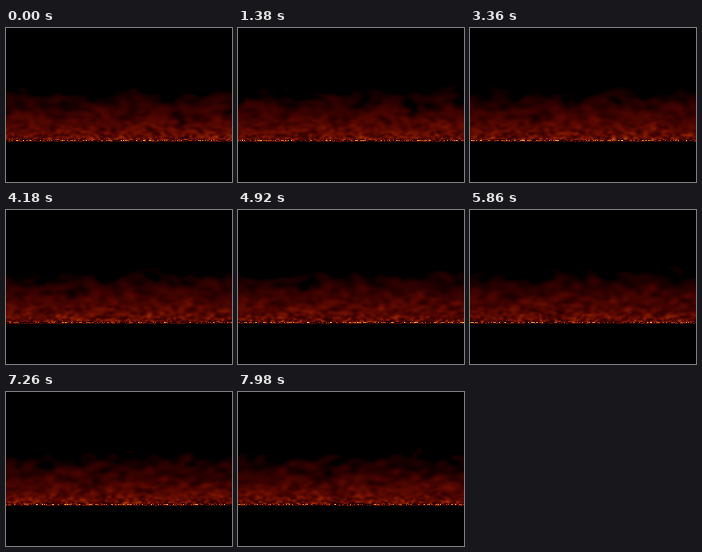
An HTML page with a canvas that plays this animation: 226x154 px, repeating every 8 s.

```html
<!DOCTYPE html>
<html lang="en">
<head>
<meta charset="utf-8">
<title>Fire</title>
<style>
  html, body { margin: 0; width: 100%; height: 100%; overflow: hidden; background: #000; }
  canvas { display: block; width: 226px; height: 154px; }
</style>
</head>
<body>
<canvas id="stage" width="226" height="154"></canvas>
<script>
const W = 226, H = 154, TOP = 36, BASE = 112;
const LOOP = 8000, FIRST = 120, STEP = 140.36, STEPS = 58;
const WARMUP = 120, COOLING = 2.55;

const ctx = document.getElementById('stage').getContext('2d');

let seed = 20731;
function random() {
  seed = (seed + 0x6D2B79F5) | 0;
  let n = Math.imul(seed ^ (seed >>> 15), 1 | seed);
  n = (n + Math.imul(n ^ (n >>> 7), 61 | n)) ^ n;
  return ((n ^ (n >>> 14)) >>> 0) / 4294967296;
}

let heat = new Float32Array(W * H);
let next = new Float32Array(W * H);

// Slow, wide swells that make the flame tops uneven.
function swell(x, step) {
  const a = x / W * 2 * Math.PI;
  return 0.03 * (Math.sin(3 * a + step * 0.19) + Math.sin(5 * a - step * 0.13));
}

// Embers: hot or cold pixels, sometimes two or more alike side by side.
function lightRow(y, strength, step) {
  let ember = 0;
  for (let x = 0; x < W; x++) {
    if (random() > 0.2) {
      const hot = random() < 0.47 + swell(x, step);
      ember = hot ? 130 + 125 * random() : 70 * random();
    }
    next[y * W + x] = ember * strength;
  }
}

// Heat drifts upward, spreads sideways and cools by a fixed amount.
function advance(step) {
  lightRow(BASE, 1, step);
  lightRow(BASE + 1, 0.45, step);
  for (let y = TOP; y < BASE; y++) {
    const below = (y + 1) * W;
    for (let x = 0; x < W; x++) {
      const sum = heat[below + (x + W - 1) % W] + heat[below + x] +
        heat[below + (x + 1) % W] + heat[below + W + x];
      next[y * W + x] = Math.max(0, sum / 4 - COOLING);
    }
  }
  [heat, next] = [next, heat];
}

function paint() {
  const image = ctx.createImageData(W, H);
  for (let i = 0; i < heat.length; i++) {
    const v = heat[i] / 255;
    const glow = Math.pow(v, 8);
    image.data[4 * i] = 205 * Math.pow(v, 0.72) + 50 * glow;
    image.data[4 * i + 1] = 110 * Math.pow(v, 2.2) + 80 * glow;
    image.data[4 * i + 2] = 80 * glow;
    image.data[4 * i + 3] = 255;
  }
  return image;
}

for (let i = 0; i < WARMUP; i++) advance(i);
const pictures = Array.from({ length: STEPS }, (_, i) => {
  advance(WARMUP + i);
  return paint();
});

let shown = -1;
function draw(now) {
  const t = now % LOOP;
  const step = t < FIRST ? 0 : Math.min(STEPS - 1, 1 + Math.floor((t - FIRST) / STEP));
  if (step !== shown) ctx.putImageData(pictures[shown = step], 0, 0);
}

const start = performance.now();
function tick() {
  draw(performance.now() - start);
  requestAnimationFrame(tick);
}
tick();
</script>
</body>
</html>
```
